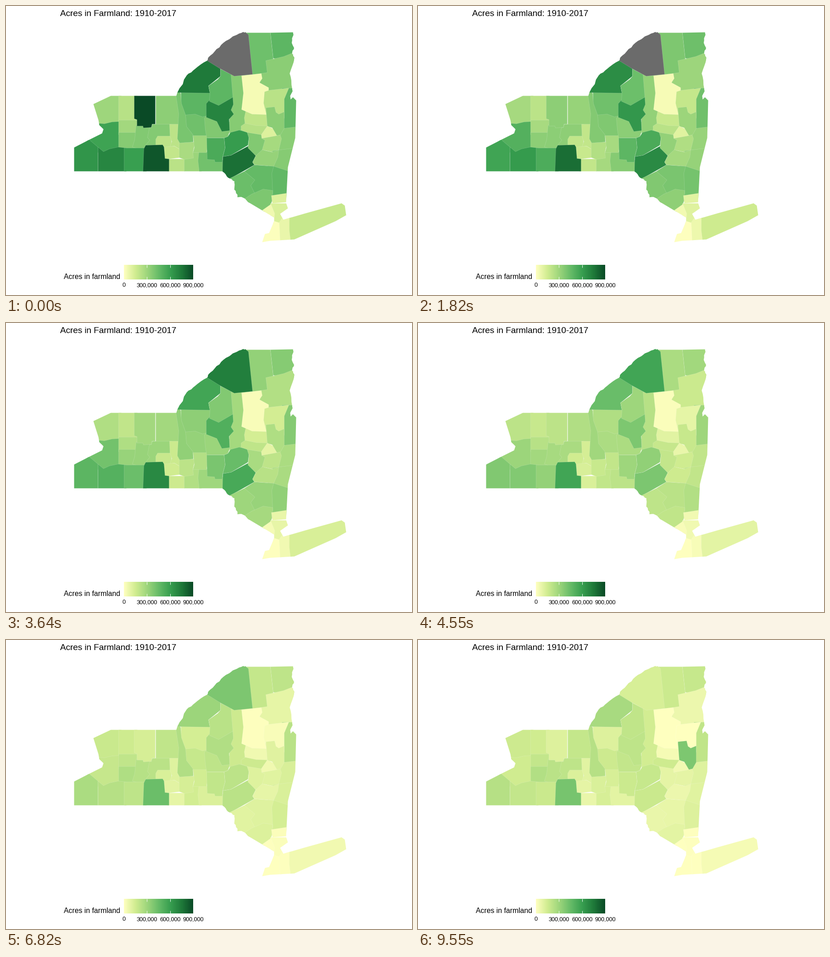
Animation of 885 by 632 pixels, one loop 10 s. Source, as a matplotlib script:

```python
import numpy as np
import matplotlib.pyplot as plt
from matplotlib.animation import FuncAnimation
from matplotlib.collections import PolyCollection
from matplotlib.colors import LinearSegmentedColormap
from matplotlib.patches import Polygon

W, H, DPI = 885, 632, 100
STEPS = 22
MISSING = (0.42, 0.42, 0.42, 1)
GREENS = LinearSegmentedColormap.from_list("greens", [
    "#ffffc0", "#d0ec90", "#9ed67c", "#67bc68", "#389f50", "#1f7a3a", "#0a4a26"], N=512)
rng = np.random.default_rng(4)


def rough(xy, size=0.8, parts=4):
    """Turn a line through a few points into a ragged shore."""
    pts = np.reshape(xy, (-1, 2))
    t = np.arange((len(pts) - 1) * parts + 1) / parts
    line = np.column_stack([np.interp(t, range(len(pts)), c) for c in pts.T])
    line[1:-1] += rng.normal(0, size, line[1:-1].shape)
    return line


def plain(*xy):
    return np.reshape(xy, (-1, 2))


coast = np.vstack([
    plain(148, 309, 181, 292, 209, 278, 212, 269, 203, 260, 201, 249, 190, 214, 228, 196,
          371, 196),
    rough([373, 189, 394, 151, 412, 136, 438, 119, 441, 112, 459, 94, 479, 76, 500, 63,
           516, 56, 523, 58]),
    plain(575, 58),
    rough([625, 57, 623, 80, 628, 92, 623, 104, 628, 113, 619, 146, 623, 179]),
    plain(624, 186, 619, 196, 620, 204, 625, 199, 632, 206, 630, 288, 614, 352, 610, 430,
          614, 442, 597, 454, 604, 467, 652, 453, 731, 431, 738, 436, 741, 457, 718, 470,
          628, 510, 575, 513, 558, 516, 564, 498, 573, 496, 584, 470, 584, 462, 527, 428),
    rough([521, 421, 504, 416, 497, 400, 498, 382, 484, 375, 471, 361]),
    plain(148, 361),
])

shapes, spans = [], []


def county(first, last, *xy):
    """Add a county painted over earlier ones; four numbers make a box."""
    if len(xy) == 4:
        x0, y0, x1, y1 = xy
        xy = (x0, y0, x1, y0, x1, y1, x0, y1)
    shapes.append(plain(*xy))
    spans.append((first, last))
    return len(shapes) - 1


# Western plain and southern tier
county(300, 160, 180, 190, 250, 262)
county(225, 150, 244, 190, 285, 255)
county(345, 185, 325, 190, 380, 262)
county(580, 150, 175, 254, 214, 257, 231, 253, 250, 252, 250, 320, 175, 320)
county(285, 190, 244, 248, 290, 280)
county(365, 240, 244, 275, 290, 320)
county(375, 215, 283, 260, 320, 260, 320, 310, 298, 315, 275, 308, 280, 292)
monroe = county(900, 110, 279, 190, 325, 190, 325, 258, 318, 258, 316, 265, 299, 266,
                298, 262, 285, 262, 285, 248, 279, 246)
county(370, 205, 318, 258, 360, 258, 360, 310, 303, 305, 313, 293, 308, 287, 312, 266,
       317, 265)
county(640, 230, 140, 292, 181, 292, 200, 308, 200, 365, 140, 365)
county(700, 190, 200, 308, 212, 318, 225, 312, 244, 308, 262, 310, 262, 365, 200, 365)
county(600, 170, 256, 309, 305, 365)
county(215, 70, 350, 333, 388, 365)
county(210, 115, 330, 284, 360, 284, 360, 310, 340, 310, 326, 303, 326, 291)
county(210, 95, 356, 258, 380, 258, 380, 314, 367, 306, 357, 307, 361, 296, 357, 284)
county(190, 85, 340, 308, 367, 306, 380, 314, 380, 331, 355, 334, 340, 340)
county(860, 405, 304, 304, 341, 303, 344, 308, 346, 333, 355, 334, 355, 365, 298, 365,
       300, 312)
county(305, 130, 387, 318, 425, 365)
county(420, 90, 420, 318, 440, 318, 475, 338, 475, 365, 421, 365, 418, 338)
county(265, 120, 377, 298, 412, 297, 407, 320, 408, 332, 388, 335, 377, 331)

# Centre
county(300, 130, 407, 281, 440, 281, 437, 320, 407, 320, 410, 309)
county(485, 110, 380, 185, 450, 245)
county(425, 160, 388, 238, 412, 236, 428, 242, 440, 239, 440, 283, 388, 283)
county(400, 230, 370, 196, 374, 185, 380, 190, 382, 213, 391, 238, 393, 263, 407, 281,
       408, 297, 378, 299, 373, 290, 376, 235)
county(380, 190, 432, 245, 436, 240, 495, 255, 483, 285, 475, 288, 437, 288, 434, 270)
county(365, 145, 485, 140, 540, 150, 530, 285, 487, 285)
county(710, 205, 436, 213, 443, 205, 494, 199, 495, 215, 490, 227, 496, 236, 486, 247,
       487, 272, 470, 274, 459, 252, 436, 243)
otsego = county(610, 180, 475, 288, 483, 285, 489, 276, 508, 271, 527, 276, 529, 288,
                527, 304, 490, 326, 472, 329, 477, 310)
county(780, 170, 472, 329, 490, 326, 527, 306, 544, 327, 537, 341, 541, 347, 490, 376,
       471, 385)
county(540, 165, 437, 288, 475, 288, 477, 310, 472, 329, 471, 341, 455, 341, 454, 336,
       438, 335)

# North
county(750, 270, 373, 189, 365, 120, 438, 105, 467, 137, 467, 153, 441, 174, 444, 190)
county(480, 200, 467, 137, 490, 149, 494, 199, 463, 217, 443, 208, 444, 190, 441, 174,
       461, 160, 467, 153)
county(430, 165, 520, 50, 575, 50, 582, 114, 575, 150, 530, 150)
county(480, 180, 575, 50, 635, 50, 635, 120, 582, 114)
county(350, 60, 566, 119, 605, 110, 635, 98, 635, 190, 548, 190, 556, 147, 569, 145)
county(470, 200, 600, 178, 640, 270)
county(220, 5, 555, 187, 572, 184, 616, 179, 606, 203, 606, 245, 555, 245)
county(200, 35, 523, 225, 575, 225, 575, 265, 521, 262, 519, 244)
county(35, 5, 513, 152, 556, 147, 558, 158, 552, 167, 572, 178, 572, 184, 563, 187,
       561, 212, 567, 237, 536, 236, 513, 226, 517, 190)
lawrence = county(960, 345, 467, 137, 430, 114, 500, 40, 528, 62, 537, 149, 497, 153)

# Upper river valley
county(230, 155, 521, 256, 545, 261, 575, 262, 575, 285, 540, 285, 525, 276, 512, 271,
       512, 262)
county(375, 85, 525, 276, 556, 281, 570, 290, 560, 325, 544, 327, 527, 310, 529, 288)
county(110, 45, 569, 262, 587, 270, 595, 285, 557, 289, 556, 281)
county(355, 105, 597, 268, 640, 263, 640, 310, 594, 315, 592, 280)
county(275, 85, 557, 289, 590, 283, 597, 281, 600, 290, 594, 315, 580, 319, 558, 314,
       564, 293)
saratoga = county(350, 80, 566, 222, 585, 220, 588, 232, 594, 236, 606, 231, 606, 267,
                  598, 281, 590, 283, 580, 266, 569, 262)
county(365, 100, 580, 316, 640, 309, 640, 365, 580, 365)

# Lower river valley and the island
county(470, 110, 570, 348, 583, 350, 620, 362, 620, 420, 570, 420)
county(320, 60, 544, 327, 558, 314, 580, 319, 594, 315, 592, 330, 583, 350, 541, 347,
       537, 341)
county(440, 70, 480, 380, 519, 361, 550, 370, 550, 430, 480, 430)
county(460, 75, 519, 361, 541, 347, 583, 350, 579, 365, 581, 410, 543, 412, 533, 392,
       542, 380)
county(390, 90, 515, 424, 535, 411, 560, 400, 581, 403, 580, 424, 577, 433, 559, 455)
county(110, 8, 578, 414, 611, 409, 620, 409, 620, 428, 580, 431)
county(120, 8, 575, 430, 620, 475)
county(50, 5, 550, 452, 577, 433, 585, 453, 584, 470)
county(10, 2, 550, 520, 550, 490, 584, 470, 600, 475, 600, 520)
county(70, 2, 595, 473, 604, 460, 617, 460, 622, 515, 597, 515, 596, 492)
county(180, 35, 617, 460, 750, 420, 750, 480, 620, 515, 617, 490)

# Steady decline with a steeper fall near the middle of the period
step = np.arange(STEPS)
decline = 0.55 * (1 - (1 - step / 21) ** 1.6) + 0.45 / (1 + np.exp(9.5 - step))
first, last = np.array(spans, float).T[:, :, None]
acres = first + (last - first) * decline

# Breaks in the records
acres[monroe, 1:] -= 510 * (1 - decline[1:])
acres[otsego, 6] = 60
acres[lawrence, :7] = np.nan
acres[[lawrence, saratoga], 21] = 130, 390


def colours(k):
    value = acres[:, k]
    rgba = GREENS(np.nan_to_num(value) / 900)
    rgba[np.isnan(value)] = MISSING
    return rgba


fig = plt.figure(figsize=(W / DPI, H / DPI), dpi=DPI, facecolor="white")
ax = fig.add_axes([0, 0, 1, 1])


def label(x, y, text, px, ha="left"):
    ax.text(x, y, text, fontsize=px * 72 / DPI, family="Liberation Sans",
            color="black", ha=ha, va="baseline")


land = PolyCollection(shapes, facecolors=colours(0), edgecolors=(1, 1, 1, 0.22),
                      linewidths=0.5)
ax.add_collection(land)
land.set_clip_path(Polygon(coast, transform=ax.transData))

label(117, 21.5, "Acres in Farmland: 1910-2017", 18.9)
label(125, 596.5, "Acres in farmland", 15.75)
ax.imshow(np.linspace(0, 1, 302)[None], cmap=GREENS, aspect="auto",
          extent=(256.5, 407.5, 597.5, 565.5))
for i in range(4):
    x = 256.5 + i * 50.3
    label(x, 613.5, f"{i * 300000:,}", 12.6, "center")
    if 0 < i < 3:
        ax.vlines([x, x], [565.5, 591.5], [571.5, 597.5], colors="white", linewidth=0.7)

# Whole numbers are pixel centres
ax.set_xlim(-0.5, W - 0.5)
ax.set_ylim(H - 0.5, -0.5)
ax.axis("off")


def draw(k):
    land.set_facecolor(colours(k))
    return [land]


anim = FuncAnimation(fig, draw, frames=STEPS, interval=10000 / STEPS, repeat=True,
                     repeat_delay=0, blit=False)
plt.show()
```
